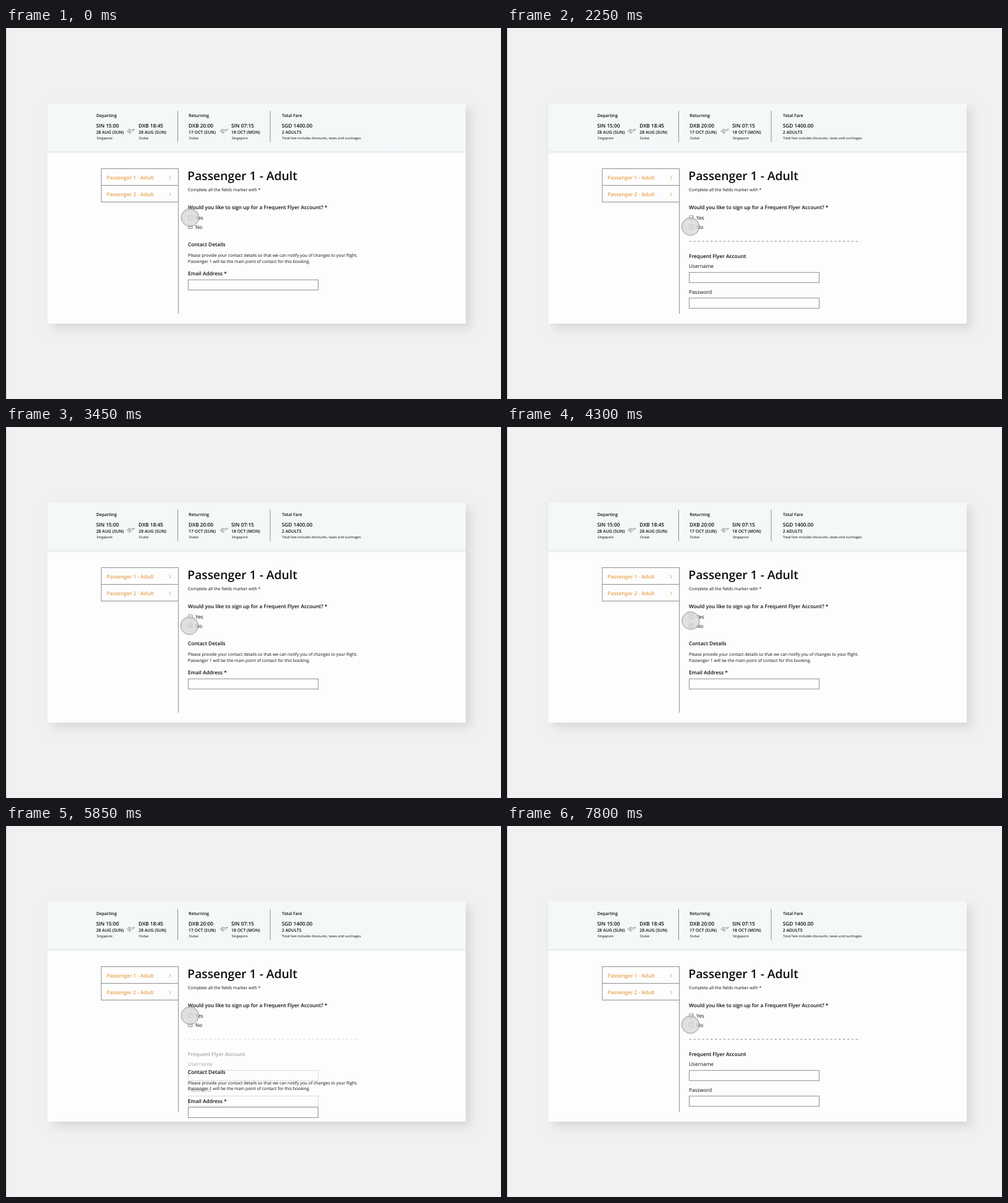
Recreate the animation shown at these times as an HTML page with a canvas. Size 800 by 600 pixels, loop 8000 ms.

```html
<!DOCTYPE html>
<html lang="en">
<head>
<meta charset="utf-8">
<title>Passenger details</title>
<style>
  html, body { margin: 0; width: 100%; height: 100%; overflow: hidden; background: #f1f1f1; }
  canvas { display: block; width: 800px; height: 600px; }
</style>
</head>
<body>
<canvas id="stage" width="800" height="600"></canvas>
<script>
const ctx = document.getElementById('stage').getContext('2d');
ctx.textRendering = 'geometricPrecision';

const LOOP = 8000;
const HALF = 2750;          // one toggle: form change, then pointer move
const SLIDE = 134.5;        // how far the contact block travels
const TINY = 5.51, SMALL = 6.89, BODY = 8.27, TITLE = 19.29;
const INK = '#0c0c0c', LINE = '#8e8e8e', ORANGE = '#e8a04c';
const CARD = { x: 67, y: 122, w: 676, h: 356 };

const clamp = v => Math.min(1, Math.max(0, v));
const easeInOut = v => v * v * (3 - 2 * v);
const easeOut = v => 1 - (1 - v) * (1 - v);

function text(str, x, y, size, weight = 400, color = INK) {
  ctx.font = `${weight} ${size}px "Open Sans", "Noto Sans", sans-serif`;
  ctx.fillStyle = color;
  ctx.fillText(str, x, y);
}

function path(points, color, width = 1, closed = false) {
  ctx.beginPath();
  points.forEach(([x, y]) => ctx.lineTo(x, y));
  if (closed) ctx.closePath();
  ctx.strokeStyle = color;
  ctx.lineWidth = width;
  ctx.stroke();
}

function box(x, y, w, h, color = LINE, width = 1) {
  ctx.strokeStyle = color;
  ctx.lineWidth = width;
  ctx.strokeRect(x, y, w, h);
}

const field = y => box(294.5, y, 210, 16.5);

function plane(x, y) {
  ctx.save();
  ctx.translate(x, y);
  path([[0, 4], [1.3, 3.6], [3, 4.5], [5.4, 3.6], [2.2, 1.7], [3.6, 1.3], [8.3, 2.4],
        [11, 1.2], [12.6, 1.3], [12, 2.4], [8.6, 4], [5.2, 7.8], [3.9, 8], [5.3, 5.2],
        [2, 6]], '#777', 0.7, true);
  ctx.restore();
}

function stop(x, time, date, city) {
  text(time, x, 161, BODY, 600);
  text(date, x, 170.8, SMALL, 600);
  text(city, x + 0.7, 180, TINY);
}

function drawCard() {
  ctx.fillStyle = '#f1f1f1';
  ctx.fillRect(0, 0, 800, 600);
  ctx.fillStyle = '#c9c9c9';
  ctx.fillRect(0, 0, 1, 600);

  ctx.save();
  ctx.shadowColor = 'rgba(0,0,0,0.10)';
  ctx.shadowBlur = 14;
  ctx.shadowOffsetX = ctx.shadowOffsetY = 8;
  ctx.fillStyle = '#fdfdfd';
  ctx.fillRect(CARD.x, CARD.y, CARD.w, CARD.h);
  ctx.restore();
}

function drawHeader() {
  const edge = ctx.createLinearGradient(0, 199, 0, 203);
  edge.addColorStop(0, '#dce1e2');
  edge.addColorStop(1, '#fdfdfd');
  ctx.fillStyle = edge;
  ctx.fillRect(CARD.x, 199, CARD.w, 4);
  ctx.fillStyle = '#f4f8f9';
  ctx.fillRect(CARD.x, CARD.y, CARD.w, 77.5);

  text('Departing', 146, 144.4, SMALL, 600);
  stop(145.7, 'SIN 15:00', '28 AUG (SUN)', 'Singapore');
  plane(195.3, 162.5);
  stop(214.3, 'DXB 18:45', '28 AUG (SUN)', 'Dubai');

  text('Returning', 295.3, 144.4, SMALL, 600);
  stop(295.1, 'DXB 20:00', '17 OCT (SUN)', 'Dubai');
  plane(345.8, 162.5);
  stop(364, 'SIN 07:15', '18 OCT (MON)', 'Singapore');

  text('Total Fare', 446, 144.4, SMALL, 600);
  stop(445.8, 'SGD 1400.00', '2 ADULTS', '');
  text('Total fare includes discounts, taxes and surchages', 446, 180, TINY);

  path([[277.5, 134], [277.5, 184.5]], LINE);
  path([[427, 134], [427, 184.5]], LINE);
}

function drawSidebar() {
  path([[278.5, 227.5], [278.5, 462]], LINE);
  [1, 2].forEach((n, i) => {
    const y = 227.5 + i * 27;
    box(154, y, 124.5, 27);
    text(`Passenger ${n} - Adult`, 162.6, y + 17.2, BODY, 600, ORANGE);
    path([[264, y + 11.9], [266.2, y + 14.6], [264, y + 17.3]], ORANGE, 1);
  });
}

function checkbox(label, y, on) {
  box(294.8, y - 3.2, 6.2, 6.2, '#777', 0.8);
  ctx.globalAlpha = on;
  path([[296.1, y - 0.2], [297.5, y + 1.3], [300, y - 1.6]], '#555', 0.8);
  ctx.globalAlpha = 1;
  text(label, 306, y + 3, BODY);
}

function drawAccount(alpha) {
  if (alpha <= 0) return;
  ctx.save();
  ctx.globalAlpha = alpha;
  ctx.setLineDash([3.45, 3.45]);
  path([[294.5, 345], [571, 345]], '#858585');
  ctx.setLineDash([]);
  text('Frequent Flyer Account', 294, 371.5, BODY, 600);
  text('Username', 294, 387.8, BODY);
  field(395.3);
  text('Password', 294, 429.5, BODY);
  field(436.8);
  ctx.restore();
}

function drawContact(shift) {
  ctx.save();
  ctx.translate(0, shift);
  text('Contact Details', 294, 353, BODY, 600);
  text('Please provide your contact details so that we can notify you of changes to your flight.',
    294, 370, SMALL);
  text('Passenger 1 will be the main point of contact for this booking.', 294, 379.6, SMALL);
  text('Email Address *', 294, 400, BODY, 600);
  field(407.3);
  ctx.restore();
}

function drawForm(yes) {
  text('Passenger 1 - Adult', 293.3, 246, TITLE, 600);
  text('Complete all the fields marker with *', 294, 263.8, SMALL);
  text('Would you like to sign up for a Frequent Flyer Account? *', 294, 293, BODY, 600);
  checkbox('Yes', 307, yes);
  checkbox('No', 321.5, 1 - yes);

  ctx.save();
  ctx.beginPath();
  ctx.rect(CARD.x, CARD.y, CARD.w, CARD.h);
  ctx.clip();
  drawAccount(yes);
  drawContact(SLIDE * yes);
  ctx.restore();
}

function ring(x, y, r, color, width) {
  ctx.beginPath();
  ctx.arc(x, y, r, 0, Math.PI * 2);
  ctx.strokeStyle = color;
  ctx.lineWidth = width;
  ctx.stroke();
}

function drawPointer(down) {
  const x = 297.4 - 0.9 * down, y = 306.3 + 14.8 * down;
  ctx.beginPath();
  ctx.arc(x, y, 14, 0, Math.PI * 2);
  ctx.fillStyle = 'rgba(214,214,214,0.76)';
  ctx.fill();
  ring(x, y, 12.8, 'rgba(240,240,240,0.8)', 1.4);
  ctx.save();
  ctx.shadowColor = 'rgba(0,0,0,0.25)';
  ctx.shadowBlur = 2;
  ctx.shadowOffsetY = 0.8;
  ring(x, y, 14, '#a0a0a0', 1);
  ctx.restore();
}

function draw(t) {
  const turn = Math.floor(t / HALF), u = t - turn * HALF;
  const flip = v => turn % 2 ? 1 - v : v;
  drawCard();
  drawHeader();
  drawSidebar();
  drawForm(flip(easeInOut(clamp((u - 150) / 500))));
  drawPointer(flip(easeOut(clamp((u - 1150) / 1200))));
}

const start = performance.now();
function tick() {
  draw((performance.now() - start) % LOOP);
  requestAnimationFrame(tick);
}
tick();
</script>
</body>
</html>
```
